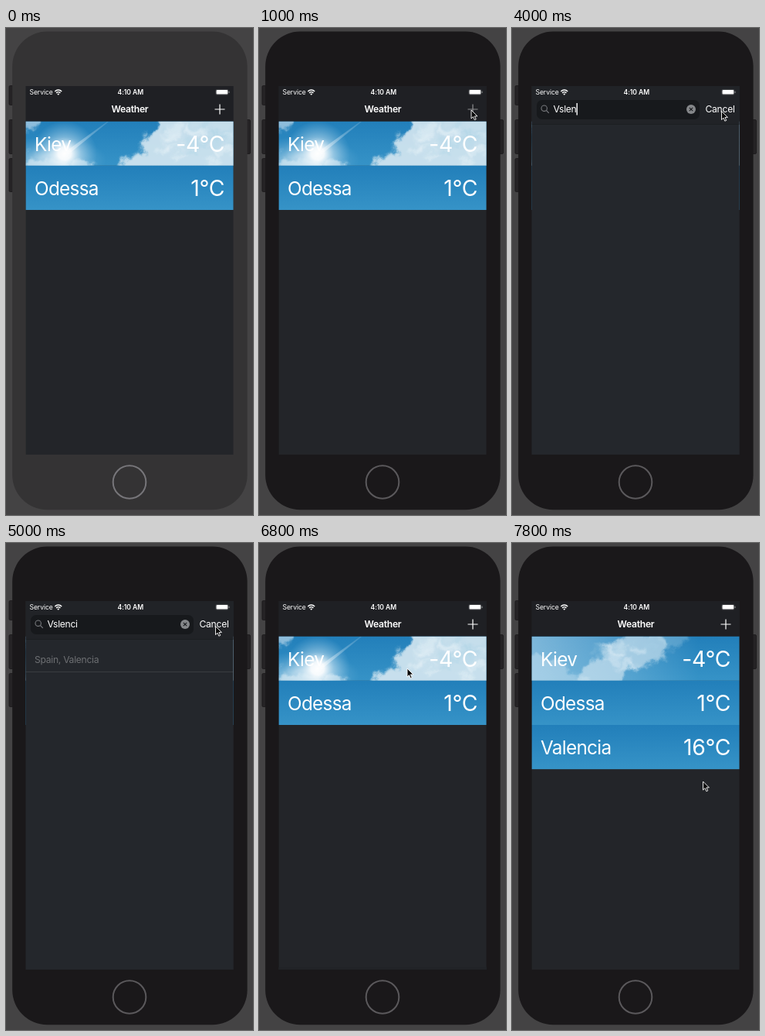
An HTML page that plays this animation: 320 by 629 pixels, repeating every 8 s.

```html
<!DOCTYPE html>
<html lang="en">
<head>
<meta charset="utf-8">
<title>Weather</title>
<style>
html, body { margin: 0; width: 100%; height: 100%; overflow: hidden; background: #444344; }
svg { display: block; width: 100%; height: 100%; }
text { font: 400 12.15px Inter, Roboto, "Liberation Sans", sans-serif; letter-spacing: -.29px; fill: #fff; white-space: pre; }
.bold { font-weight: 600; }
.mid { text-anchor: middle; }
.status { font-size: 8.6px; letter-spacing: -.08px; }
.city { font-size: 24.3px; letter-spacing: -.7px; }
.temp { font-size: 28.4px; letter-spacing: -.3px; text-anchor: end; }
</style>
</head>
<body>
<svg viewBox="0 0 320 629">
  <defs>
    <linearGradient id="sky" x2="0" y2="1">
      <stop stop-color="#227fba"/><stop offset="1" stop-color="#3693c7"/>
    </linearGradient>
    <radialGradient id="sun">
      <stop stop-color="#fff"/><stop offset=".2" stop-color="#fff" stop-opacity=".92"/>
      <stop offset=".5" stop-color="#dceef8" stop-opacity=".45"/><stop offset="1" stop-color="#a5d2ec" stop-opacity="0"/>
    </radialGradient>
    <linearGradient id="beam" x1="0" y1="1" x2="1" y2="0">
      <stop stop-color="#fff" stop-opacity=".45"/><stop offset="1" stop-color="#fff" stop-opacity=".12"/>
    </linearGradient>
    <linearGradient id="haze">
      <stop stop-color="#b4d8ec" stop-opacity=".62"/><stop offset=".35" stop-color="#a8d2ea" stop-opacity=".4"/>
      <stop offset=".8" stop-color="#a0cee8" stop-opacity="0"/>
    </linearGradient>
    <filter id="fluff" filterUnits="userSpaceOnUse" x="6" y="101" width="308" height="97" color-interpolation-filters="sRGB">
      <feGaussianBlur stdDeviation="2" result="soft"/>
      <feTurbulence type="fractalNoise" baseFrequency=".055" numOctaves="4" seed="4"/>
      <feDisplacementMap in="soft" scale="26" xChannelSelector="R" yChannelSelector="G"/>
    </filter>
    <clipPath id="screenClip"><rect x="25.700" y="75" width="268.800" height="476"/></clipPath>
    <clipPath id="rowClip"><rect x="25" y="120.700" width="270" height="57.150"/></clipPath>
  </defs>

  <rect width="320" height="629" fill="#444344"/>
  <g fill="#252325" stroke="#1a191a" stroke-width=".8">
    <rect x="4" y="74.500" width="6" height="25" rx="1.500"/>
    <rect x="4" y="118.500" width="6" height="44" rx="1.500"/>
    <rect x="4" y="168.500" width="6" height="43" rx="1.500"/>
    <rect x="310" y="118.500" width="6.500" height="44" rx="1.500"/>
  </g>
  <rect id="body" x="8.200" y="4.600" width="304.400" height="617.600" rx="45"/>
  <circle id="home" cx="160" cy="586.500" r="21.300" fill="none" stroke-width="2"/>

  <g clip-path="url(#screenClip)">
    <rect x="25" y="75" width="270" height="476" fill="#232529"/>
    <rect x="25" y="75" width="270" height="46" fill="#1f2024"/>
    <text class="bold mid" x="160.500" y="109.400">Weather</text>
    <path id="plus" d="M270.500 105h13M277 98.500v13" stroke="#fff" stroke-width="1.200"/>
    <g id="rows"></g>

    <g id="modal">
      <rect x="25" y="75" width="270" height="476" fill="#24272c"/>
      <rect x="25" y="75" width="270" height="49" fill="#212327"/>
      <path d="M25 124.500h270" stroke="#1b1d20" stroke-width=".8"/>
      <rect x="32" y="93" width="211" height="25" rx="7" fill="#17191c"/>
      <g fill="none" stroke="#77797d" stroke-width="1.100">
        <circle cx="41.700" cy="103.700" r="3.700"/><path d="M44.500 106.500l3.300 3.400"/>
      </g>
      <text id="hint" x="52.500" y="109.200" style="fill:#6d6f73">Enter city</text>
      <text id="query" x="53.500" y="109.200"></text>
      <rect id="caret" y="97" width="1.400" height="15.500" fill="#fff"/>
      <g id="clear">
        <circle cx="232" cy="105" r="6" fill="#85878a"/>
        <path d="M229.800 102.800l4.400 4.400m0-4.400l-4.400 4.400" stroke="#17191c" stroke-width="1.100"/>
      </g>
      <text x="250.500" y="109.200">Cancel</text>
      <g id="result">
        <text x="37" y="155">Spain, Valencia</text>
        <path d="M25 166.500h270" stroke="#6c6f73" stroke-width=".9"/>
      </g>
    </g>

    <text class="status" x="30.500" y="86">Service</text>
    <path d="M63.300 81.900a6.300 6.300 0 0 1 8.900 0M65.100 83.900a3.800 3.800 0 0 1 5.300 0" fill="none" stroke="#fff" stroke-width="1.400"/>
    <path d="M66.300 85.200a2 2 0 0 1 2.900 0l-1.450 1.500z" fill="#fff"/>
    <text class="status bold mid" x="161.300" y="86">4:10 AM</text>
    <rect x="271.800" y="79.400" width="16.200" height="6.800" rx="1.600" fill="none" stroke="#5d5f63" stroke-width=".5"/>
    <rect x="272.500" y="80" width="14.800" height="5.600" rx="1" fill="#fff"/>
    <path d="M289 81.700v2.300" stroke="#8b8d90"/>
  </g>
  <path id="pointer" d="M0 0V11l2.500-2.400 1.800 4.100 1.900-.8-1.800-4h3.500Z" fill="#080808" stroke="#fff" stroke-width=".9" stroke-linejoin="round"/>
</svg>
<script>
const LOOP = 8000, STEP = 200;
const ROW = 57.15, TOP = 120.7, SCREEN_H = 476;
const OPEN = 1000, PICK = 6440, RELOAD = 7200;
const $ = id => document.getElementById(id);
const set = (id, name, value) => $(id).setAttribute(name, value);
const show = (id, on) => set(id, 'opacity', +on);
const clamp = v => Math.max(0, Math.min(1, v));

let seed = 7;
const rand = () => (seed = seed * 16807 % 2147483647) / 2147483647;

// Soft light and shade scattered inside an ellipse
function shading(x, y, w, h, count) {
  let out = '';
  for (let i = 0; i < count; i++) {
    const a = rand() * 2 * Math.PI, d = Math.sqrt(rand());
    out += `<ellipse cx="${x + w * d * Math.cos(a)}" cy="${y + h * d * Math.sin(a)}" rx="${5 + rand() * 9}" ry="${2 + rand() * 4}" fill="${i % 2 ? '#fff' : '#a9cfe5'}" opacity=".3"/>`;
  }
  return out;
}

const sunny = `
  <ellipse cx="58" cy="170" rx="72" ry="30" fill="url(#sun)" opacity=".6"/>
  <g filter="url(#fluff)">
    <path d="M135 190L158 168 182 160 176 146 194 132 204 112H315V195Z" fill="#d8e8f1" opacity=".9"/>
    <path d="M10 195V166L40 169 70 172 110 176 128 195Z" fill="#dcebf4" opacity=".7"/>
    <path d="M10 110H48L40 128 10 136Z" fill="#d5e7f2" opacity=".6"/>
    ${shading(245, 150, 55, 26, 34)}
  </g>
  <circle cx="76" cy="162" r="42" fill="url(#sun)"/>
  <path d="M78 159L131 121h2L81 163z" fill="url(#beam)"/>`;

const cloudy = `
  <rect x="25" y="${TOP}" width="270" height="${ROW}" fill="url(#haze)"/>
  <g filter="url(#fluff)">
    <path d="M78 190L92 164 112 152 116 138 134 128 152 112H188L202 132 196 146 176 158 152 166 130 190Z" fill="#cfe3ef" opacity=".68"/>
    <path d="M10 190V150L34 142 58 154 84 170 96 190Z" fill="#d5e8f3" opacity=".42"/>
    <path d="M178 112H235L222 130 200 142Z" fill="#b9d9eb" opacity=".3"/>
    ${shading(142, 148, 38, 20, 16)}
  </g>`;

const row = (i, city, temp, art = '') => `<g id="row${i}">
  <rect x="25" y="${TOP + i * ROW}" width="270" height="${ROW}" fill="url(#sky)"/>${art}
  <text class="city" x="37" y="${158.7 + i * ROW}">${city}</text>
  <text class="temp" x="283.300" y="${160 + i * ROW}">${temp}</text></g>`;

$('rows').innerHTML =
  row(0, 'Kiev', '-4°C', `<g clip-path="url(#rowClip)"><g id="sunny">${sunny}</g><g id="cloudy">${cloudy}</g></g>`) +
  row(1, 'Odessa', '1°C') + row(2, 'Valencia', '16°C');

// time, x, y
const path = [
  [200, 292, 196], [800, 275, 106], [1600, 275, 106], [2000, 271.5, 107.5],
  [5800, 271.5, 107.5], [6000, 271, 109], [6400, 188, 150], [6800, 192, 162],
  [7200, 199.5, 221], [7800, 247.5, 308]
];
function pointerAt(t) {
  const n = path.findIndex(p => p[0] > t);
  if (n < 0) return path[path.length - 1].slice(1);
  const [t0, x0, y0] = path[Math.max(0, n - 1)], [t1, x1, y1] = path[n];
  const k = t1 > t0 ? clamp((t - t0) / (t1 - t0)) : 0, e = k * k * (3 - 2 * k);
  return [x0 + (x1 - x0) * e, y0 + (y1 - y0) * e];
}

// Critically damped spring, 1 to 0
function spring(ms) {
  const s = Math.max(0, ms) * .0195;
  return (1 + s) * Math.exp(-s);
}

function caretOn(t) {
  if (t < 3200) return t % 800 < 400;
  if (t < 4800) return true;
  return t < 5800 && (t - 4800) % 800 >= 400;
}

function render(t) {
  const active = t >= 200, reloaded = t >= RELOAD;
  set('body', 'fill', active ? '#1a181a' : '#343334');
  set('home', 'stroke', active ? '#5b595c' : '#77767a');
  show('pointer', active);
  set('pointer', 'transform', `translate(${pointerAt(t)})`);
  set('plus', 'opacity', t >= OPEN && t < 1400 ? .5 : 1);

  show('sunny', !reloaded);
  set('cloudy', 'opacity', reloaded ? .1 + .9 * clamp((t - RELOAD) / 600) : 0);
  show('row2', reloaded);

  const drop = t < PICK ? spring(t - OPEN) : 1 - spring(t - PICK);
  set('modal', 'transform', `translate(0 ${SCREEN_H * drop})`);
  show('modal', t >= OPEN && t < 7000);

  const typed = 'Vslenci'.slice(0, Math.max(0, Math.floor((t - 3000) / 200)));
  $('query').textContent = typed;
  show('hint', !typed);
  show('clear', typed.length > 0);
  set('caret', 'x', 53 + (typed ? $('query').getComputedTextLength() + .5 : 0));
  show('caret', caretOn(t));
  set('result', 'opacity', clamp((t - 4800) / 600));
}

function frame() {
  const t = performance.now() % LOOP;
  render(Math.floor(t / STEP) * STEP);
  requestAnimationFrame(frame);
}
frame();
</script>
</body>
</html>
```
